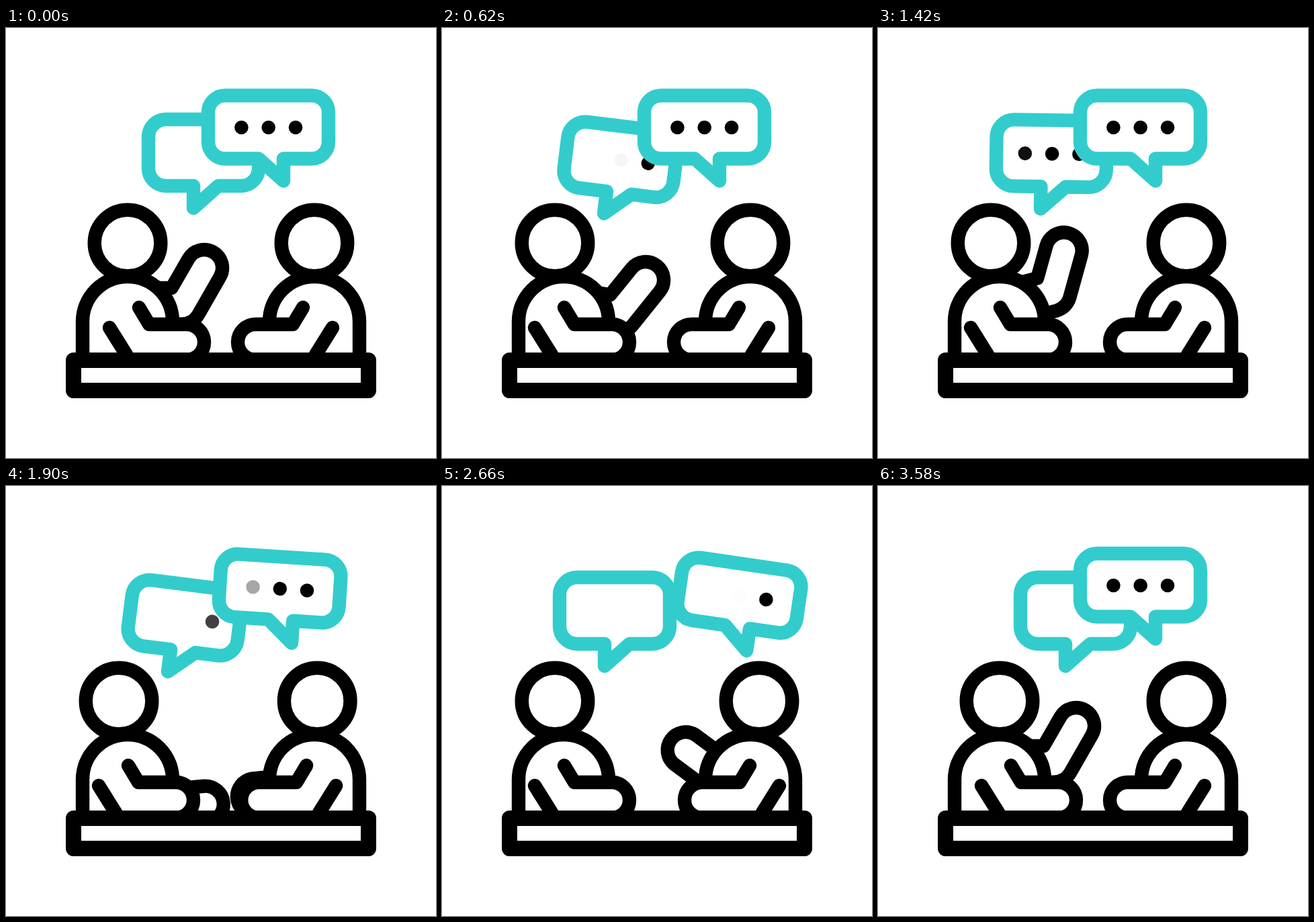
These frames come from a looping animation (640x640 px, 3.6 s). An HTML page:

```html
<!DOCTYPE html>
<html lang="en">
<head>
<meta charset="utf-8">
<title>Conversation</title>
<style>
  html, body { margin: 0; height: 100%; overflow: hidden; background: #fff; }
  svg { display: block; width: 100%; height: 100%; }
  .line { fill: #fff; stroke: #000; stroke-width: 20.4; stroke-linecap: round; stroke-linejoin: round; }
  .bubble { stroke: #33cccc; }
</style>
</head>
<body>
<svg viewBox="0 0 640 640">
  <defs>
    <clipPath id="aboveTable"><path d="M0 0H640V494H0Z"/></clipPath>
    <path id="body" d="M114 494V437a67 67 0 0 1 134 0V494"/>
    <circle id="head" cx="181" cy="320" r="49.3"/>
    <path id="forearm" d="M198 416L213 441H268.5a26.5 26.5 0 0 1 0 53H190q-7 0-11-8L154 446"/>
  </defs>

  <g id="leftBubble">
    <path class="line bubble" d="M279 235H238a26 26 0 0 1-26-26V162a26 26 0 0 1 26-26H350a26 26 0 0 1 26 26V209a26 26 0 0 1-26 26H316L279 268Z"/>
  </g>
  <g id="rightBubble">
    <path class="line bubble" d="M413 194.500H455a25 25 0 0 0 25-25V125.500a25 25 0 0 0-25-25H326a25 25 0 0 0-25 25V169.500a25 25 0 0 0 25 25H376L413 227.500Z"/>
  </g>

  <g class="line" id="leftPerson">
    <g clip-path="url(#aboveTable)">
      <path class="raised" d="M205 387H246.500L271.600 343.500A27 27 0 0 1 318.400 370.500L286 427Q278 440 262 441H215"/>
    </g>
    <use href="#body"/><use class="head" href="#head"/><use class="forearm" href="#forearm"/>
  </g>
  <g class="line" id="rightPerson" transform="translate(640) scale(-1 1)">
    <g clip-path="url(#aboveTable)">
      <path class="raised" d="M202 411L252 355A27 27 0 0 1 292 391L242 447"/>
    </g>
    <use href="#body"/><use class="head" href="#head"/><use class="forearm" href="#forearm"/>
  </g>

  <rect class="line" x="100.500" y="494.500" width="439" height="45" style="stroke-width:23"/>
</svg>
<script>
const LOOP = 3600, FADE = 219;
const $ = selector => document.querySelector(selector);
const place = (selector, transform) => $(selector).setAttribute("transform", transform);

const ramp = (t, from, to) => Math.min(1, Math.max(0, (t - from) / (to - from)));
const ease = (t, from, to) => {
  const u = ramp(t, from, to);
  return u * u * (3 - 2 * u);
};
// Swings from 0 to 1 and back.
const pulse = (t, from, to) => Math.sin(Math.PI * ramp(t, from, to)) ** 2;

function addDots(id, x, y) {
  return [-1, 0, 1].map(side => {
    const dot = document.createElementNS("http://www.w3.org/2000/svg", "circle");
    Object.entries({ cx: x + side * 40.3, cy: y, r: 10.3 }).forEach(([key, value]) => dot.setAttribute(key, value));
    return $(id).appendChild(dot);
  });
}
const leftDots = addDots("#leftBubble", 295, 186);
const rightDots = addDots("#rightBubble", 390.7, 148);

// Dots vanish first to last and return last to first.
const stagger = (t, start, step) => ramp(t, start + step * FADE, start + (step + 1) * FADE);
const hide = (t, start, i) => stagger(t, start, i);
const show = (t, start, i) => stagger(t, start, 2 - i);

function posePerson(id, lean, angle) {
  place(id + " .raised", `rotate(${angle} 184 417)`);
  place(id + " .head", `translate(${-13 * lean})`);
  place(id + " .forearm", `translate(${-16 * lean})`);
}

function draw() {
  const t = performance.now() % LOOP;
  const back = ease(t, 3140, 3540);
  const leftLean = ease(t, 0, 370) - back;
  const rightLean = ease(t, 1760, 2130) - back;

  const leftArm = 9 * ease(t, 0, 640) - 23.4 * ease(t, 640, 1420) + 112.4 * ease(t, 1420, 2250) - 98 * back;
  const rightArm = 80 * (1 - rightLean) + 12 * ease(t, 2200, 2600) - 6 * ease(t, 2600, 3100) - 6 * back;
  posePerson("#leftPerson", leftLean, leftArm);
  posePerson("#rightPerson", rightLean, rightArm);

  const leftTilt = 7 * pulse(t, 0, 1320) + 8 * pulse(t, 1320, 2280);
  const rightTilt = 9 * (pulse(t, 1760, 2400) + pulse(t, 2400, 3040));
  place("#leftBubble", `translate(${-37 * leftLean}) rotate(${leftTilt} 213 264)`);
  place("#rightBubble", `translate(${49.7 * rightLean} ${15 * rightLean}) rotate(${rightTilt} 390.5 163)`);

  leftDots.forEach((dot, i) => dot.setAttribute("opacity", show(t, 394, i) - hide(t, 1407, i)));
  rightDots.forEach((dot, i) => dot.setAttribute("opacity", 1 - hide(t, 1758, i) + show(t, 2440, i)));
  requestAnimationFrame(draw);
}
draw();
</script>
</body>
</html>
```
